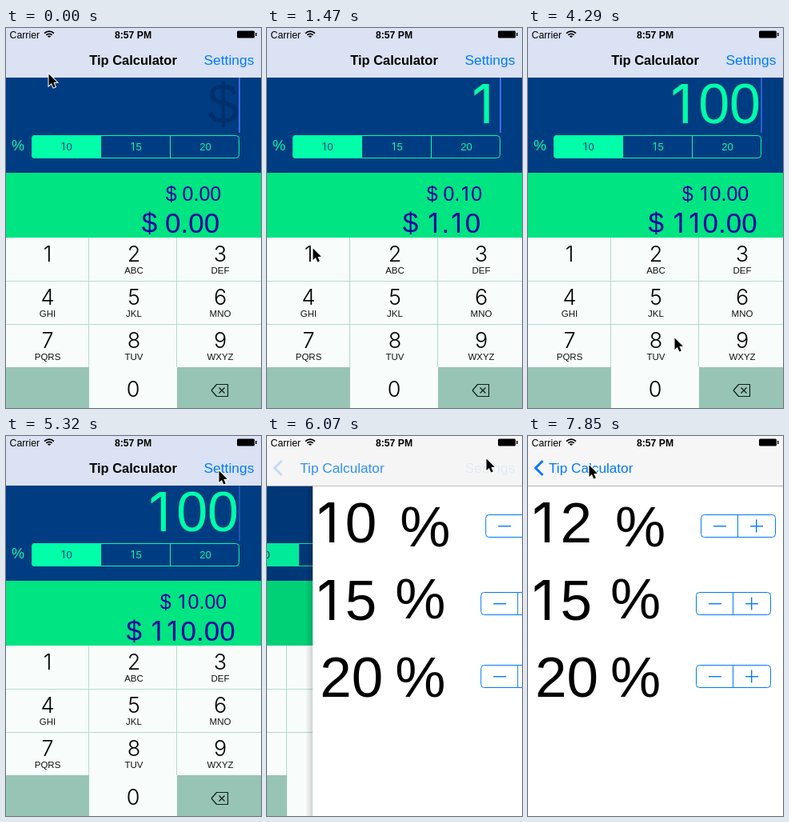
Write an HTML page with a canvas that moves like this. It is 319 px wide and 475 px high and loops after 7990 ms.

```html
<!DOCTYPE html>
<html lang="en">
<head>
<meta charset="utf-8">
<title>Tip Calculator</title>
<style>
html, body { margin: 0; width: 100%; height: 100%; overflow: hidden; background: #fff; }
canvas { display: block; width: 319px; height: 475px; }
</style>
</head>
<body>
<canvas id="stage" width="319" height="475"></canvas>
<script>
const ctx = document.getElementById('stage').getContext('2d');
const W = 319, H = 475, LOOP = 7990, TICK = 148.1;
const SANS = '"Liberation Sans", Arial, sans-serif';
const PLAIN = 'Inter, "Liberation Sans", sans-serif';
const BLUE = '#007aff', NAVY = '#003c82', TEAL = '#00ffa8', INK = '#0a00a0';

// Each pointer move, in ticks
const MOVES = [
  { from: 2, to: 7, x: 57, y: 275 },
  { from: 11, to: 16, x: 168, y: 451 },
  { from: 27, to: 35, x: 266, y: 43 },
  { from: 36, to: 37, x: 274, y: 28 },
  { from: 41, to: 43, x: 265, y: 36 },
  { from: 43, to: 47, x: 284, y: 111 },
  { from: 51, to: 53, x: 76, y: 36 }
];

const clamp = v => Math.max(0, Math.min(1, v));
const smooth = u => u * u * (3 - 2 * u);
const mix = (a, b, p) => a + (b - a) * p;
const mixRgb = (a, b, p) => `rgb(${a.map((v, i) => Math.round(mix(v, b[i], p)))})`;

function rect(x, y, w, h, color) {
  ctx.fillStyle = color;
  ctx.fillRect(x, y, w, h);
}

function text(str, x, y, font, color, align = 'left') {
  ctx.font = font;
  ctx.fillStyle = color;
  ctx.textAlign = align;
  ctx.fillText(str, x, y);
}

const sans = (size, weight = '') => `${weight} ${size}px ${SANS}`;

// Equal-width figures, with a 1 that has no foot
function figures(value, x, y, size, color, align = 'left') {
  const chars = [...String(value)];
  ctx.font = sans(size);
  const widths = chars.map(c => ctx.measureText(c).width);
  const total = widths.reduce((a, b) => a + b, 0);
  x -= total * { left: 0, center: 0.5, right: 1 }[align];
  chars.forEach((c, i) => {
    if (c === '1') text(c, x + widths[i] * 0.46, y, `${size * 0.96}px ${PLAIN}`, color, 'center');
    else text(c, x, y, sans(size), color);
    x += widths[i];
  });
}

function line(points, color, width) {
  ctx.beginPath();
  points.forEach(([x, y]) => ctx.lineTo(x, y));
  ctx.strokeStyle = color;
  ctx.lineWidth = width;
  ctx.stroke();
}

function roundBox(x, y, w, h, r, color) {
  ctx.beginPath();
  ctx.roundRect(x + 0.5, y + 0.5, w - 1, h - 1, r);
  ctx.strokeStyle = color;
  ctx.lineWidth = 1;
  ctx.stroke();
}

function faded(alpha, draw) {
  ctx.save();
  ctx.globalAlpha = clamp(alpha);
  draw();
  ctx.restore();
}

function shifted(x, y, draw) {
  ctx.save();
  ctx.translate(x, y);
  draw();
  ctx.restore();
}

// Share of the push transition still to go: a critically damped spring
function remaining(k) {
  const s = 18 * Math.max(0, k * 148 - 5893.6) / 1000;
  return (1 + s) * Math.exp(-s);
}

function caretAlpha(k) {
  const period = 6.75, typing = k >= 9 && k < 23;
  const phase = (k + 4 + period * 4 - 27) % period;
  return typing ? 1 : phase < 3 ? 0 : clamp(period - phase);
}

function pointerAt(k) {
  let x = 53, y = 57;
  for (const m of MOVES) {
    const u = smooth(clamp((k - m.from) / (m.to - m.from)));
    x = mix(x, m.x, u);
    y = mix(y, m.y, u);
  }
  return [Math.round(x), Math.round(y)];
}

function drawDelete() {
  const color = '#10201b';
  ctx.lineJoin = 'round';
  line([[257, 453], [263.5, 445.5], [277.5, 445.5], [277.5, 460.5], [263.5, 460.5], [257, 453]], color, 1.2);
  for (const d of [-3.5, 3.5]) line([[270 - d, 449.5], [270 + d, 456.5]], color, 1.2);
}

function drawKeypad(pressed) {
  const letters = ['', 'ABC', 'DEF', 'GHI', 'JKL', 'MNO', 'PQRS', 'TUV', 'WXYZ'];
  const font = `300 27px ${PLAIN}`, shade = '#98c4b6', rule = '#b4dacc';
  rect(0, 262, W, 213, '#f8fdfb');
  if (pressed) rect(0, 262, 103, 54, shade);
  rect(0, 424, 104, 51, shade);
  rect(214, 424, 105, 51, shade);
  for (let i = 0; i < 2; i++) {
    rect(0, 316 + 54 * i, W, 1, rule);
    rect(103 + 110 * i, 262, 1, 162, rule);
  }
  letters.forEach((s, i) => {
    const x = 52 + 108 * (i % 3), y = 292 + 54 * Math.floor(i / 3);
    text(i + 1, x, y, font, '#000', 'center');
    text(s, x, y + 15, sans(11.5), '#111', 'center');
  });
  text('0', 159, 461, font, '#000', 'center');
  drawDelete();
}

function drawMain(k, dim) {
  const bill = k < 10 ? 0 : k < 17 ? 1 : k < 19 ? 10 : 100;
  rect(0, 62, W, 119, NAVY);
  rect(0, 181, W, 81, '#00e481');
  figures(bill || '$', 291, 119, 70, bill ? TEAL : '#00306c', 'right');
  faded(caretAlpha(k), () => rect(291, 62, 2, 69, '#4169e8'));

  text('%', 7, 153, sans(18), TEAL);
  ctx.beginPath();
  ctx.roundRect(32, 134, 87, 29, [4, 0, 0, 4]);
  ctx.fillStyle = TEAL;
  ctx.fill();
  roundBox(32, 134, 260, 29, 4, TEAL);
  rect(205, 134, 1, 29, TEAL);
  [10, 15, 20].forEach((n, i) => figures(n, 75.5 + 87 * i, 153, 13, i ? TEAL : NAVY, 'center'));

  figures('$ ' + (bill * 0.1).toFixed(2), 234.5, 216, 25, INK, 'center');
  figures('$ ' + (bill * 1.1).toFixed(2), 218.5, 256, 35, INK, 'center');
  rect(0, 62, W, 200, `rgba(0,0,0,${0.1 * dim})`);
  drawKeypad(k === 9);
}

function stepper(x, y) {
  roundBox(x, y, 94, 29, 4, BLUE);
  rect(x + 46, y, 1, 29, BLUE);
  rect(x + 16, y + 14, 16, 1.4, BLUE);
  rect(x + 62, y + 14, 16, 1.4, BLUE);
  rect(x + 69, y + 6.5, 1.4, 16, BLUE);
}

function drawSettings(k) {
  const row = (n, x, y, percentY, stepY, inset = 0) => {
    figures(n, x, y, 71, '#000');
    text('%', 109 - inset, percentY, sans(71), '#000');
    stepper(216 - inset, stepY);
  };
  rect(0, 62, W, H - 62, '#fff');
  row(10 + clamp(k - 49 + 1) + clamp(k - 50 + 1), 1, 133, 138, 98);
  row(15, 1, 230, 228, 195, 6);
  row(20, 9, 326, 326, 286, 6);
}

function drawBar(k, p) {
  const pushing = p < 1, x = 26 + 85 * p;
  rect(0, 0, W, 62, mixRgb([246, 246, 246], [218, 226, 243], p * p));
  faded(1 - p, () => rect(0, 62, W, 1, '#b4b4b4'));
  faded(2 * p - 1, () =>
    text('Tip Calculator', pushing ? x + 48 : 159, 46, sans(16.5, 'bold'), '#000', 'center'));
  faded(1 - p, () => text('Tip Calculator', x, 46, sans(17.2), BLUE));
  faded(k === 39 ? 0.4 : p ** 1.5, () => text('Settings', 247.5, 46, sans(17.4), BLUE));
  ctx.lineJoin = 'miter';
  faded(1 - 4.4 * p, () => line([[18.5, 31], [9.5, 40], [18.5, 49]], BLUE, 3));
}

function drawStatus() {
  text('Carrier', 4.5, 13, sans(12.3), '#000');
  text('8:57 PM', 159, 13, sans(12.2, 'bold'), '#000', 'center');
  for (let i = 0; i < 3; i++) {
    ctx.beginPath();
    ctx.arc(54, 12.5, 2 + 3.2 * i, -Math.PI * 0.75, -Math.PI * 0.25);
    ctx.strokeStyle = '#000';
    ctx.lineWidth = 1.8;
    ctx.stroke();
  }
  ctx.beginPath();
  ctx.roundRect(289, 3.5, 22, 9, 1.5);
  ctx.fillStyle = '#000';
  ctx.fill();
  rect(312, 6, 1.5, 4, '#000');
}

function drawPointer() {
  ctx.beginPath();
  for (const [x, y] of [[0, 0], [0, 14.5], [3.4, 11.4], [5.8, 17], [8.3, 15.9], [5.9, 10.5], [10.3, 10.3]]) {
    ctx.lineTo(x, y);
  }
  ctx.closePath();
  ctx.lineJoin = 'miter';
  ctx.lineWidth = 2;
  ctx.strokeStyle = '#fff';
  ctx.stroke();
  ctx.fillStyle = '#000';
  ctx.fill();
}

function drawShadow(x) {
  const g = ctx.createLinearGradient(x - 9, 0, x, 0);
  g.addColorStop(0, 'rgba(0,0,0,0)');
  g.addColorStop(1, 'rgba(0,0,0,0.17)');
  rect(x - 9, 62, 9, H - 62, g);
}

function draw(t) {
  const k = Math.min(53, Math.floor((t + 14) / TICK));
  const p = remaining(k), left = W * p;
  rect(0, 0, W, H, '#fff');
  if (left > 1) shifted(-Math.round(96 * (1 - p)), 0, () => drawMain(k, 1 - p));
  if (p < 1) {
    if (left > 1) drawShadow(left);
    shifted(left, 0, () => drawSettings(k));
  }
  drawBar(k, p);
  drawStatus();
  const [x, y] = pointerAt(k);
  shifted(x + 0.5, y + 0.5, drawPointer);
}

const start = performance.now();
function loop() {
  draw((performance.now() - start) % LOOP);
  requestAnimationFrame(loop);
}
loop();
</script>
</body>
</html>
```
